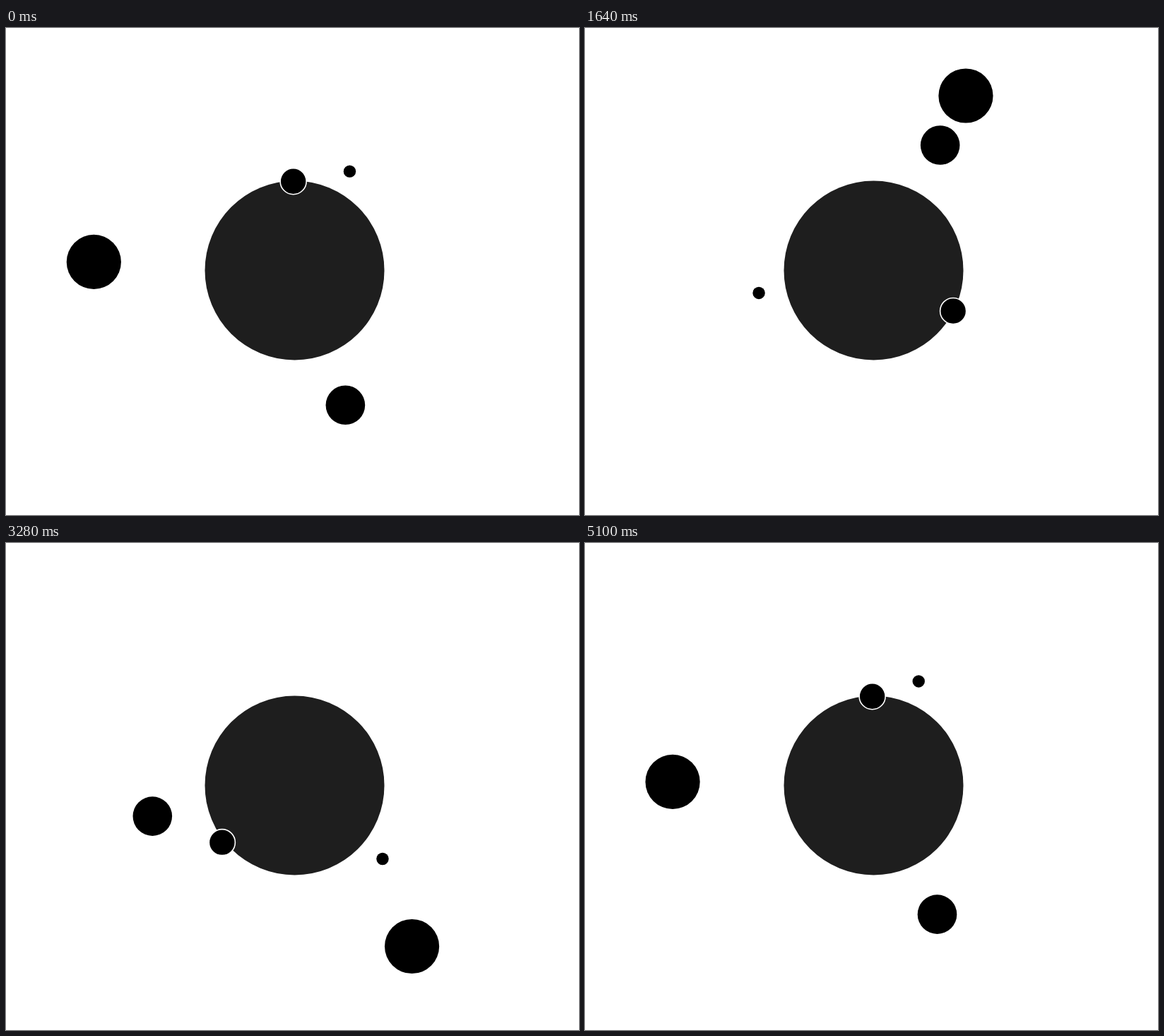
Animation, 811 px wide and 690 px high, one loop 5120 ms. Source, as an HTML page:

```html
<!DOCTYPE html>
<html lang="en">
<head>
<meta charset="utf-8">
<title>Orbits</title>
<style>
  html, body { margin: 0; width: 100%; height: 100%; overflow: hidden; background: #fff; }
  svg { display: block; width: 811px; height: 690px; }
</style>
</head>
<body>
<svg id="stage" viewBox="0 0 811 690">
  <circle cx="408.5" cy="343.5" r="127" fill="#1e1e1e"/>
</svg>
<script>
const LOOP = 5120, TICK = 20;
const CENTER = { x: 406.2, y: 345 };

// orbit radius, start angle in degrees, ms per turn
const moons = [
  { size: 38.6, orbit: 282.2, start: 182.75, turn: 5120 },
  { size: 27.8, orbit: 203.3, start: 68.6, turn: 2570 },
  { size: 8.7, orbit: 163, start: -60.5, turn: 2570 },
  { size: 18.5, orbit: 127.8, start: -89.8, turn: 5100, outline: 1.6 },
];

const stage = document.getElementById('stage');

for (const moon of moons) {
  moon.el = document.createElementNS(stage.namespaceURI, 'circle');
  moon.el.setAttribute('r', moon.size);
  if (moon.outline) {
    moon.el.setAttribute('stroke', '#fff');
    moon.el.setAttribute('stroke-width', moon.outline);
  }
  stage.append(moon.el);
}

function draw(now) {
  const time = Math.floor((now % LOOP) / TICK) * TICK;
  for (const { el, orbit, start, turn } of moons) {
    const angle = (start / 360 + time / turn) * 2 * Math.PI;
    el.setAttribute('cx', CENTER.x + orbit * Math.cos(angle));
    el.setAttribute('cy', CENTER.y + orbit * Math.sin(angle));
  }
}

const begin = performance.now();

function frame() {
  draw(performance.now() - begin);
  requestAnimationFrame(frame);
}
frame();
</script>
</body>
</html>
```
